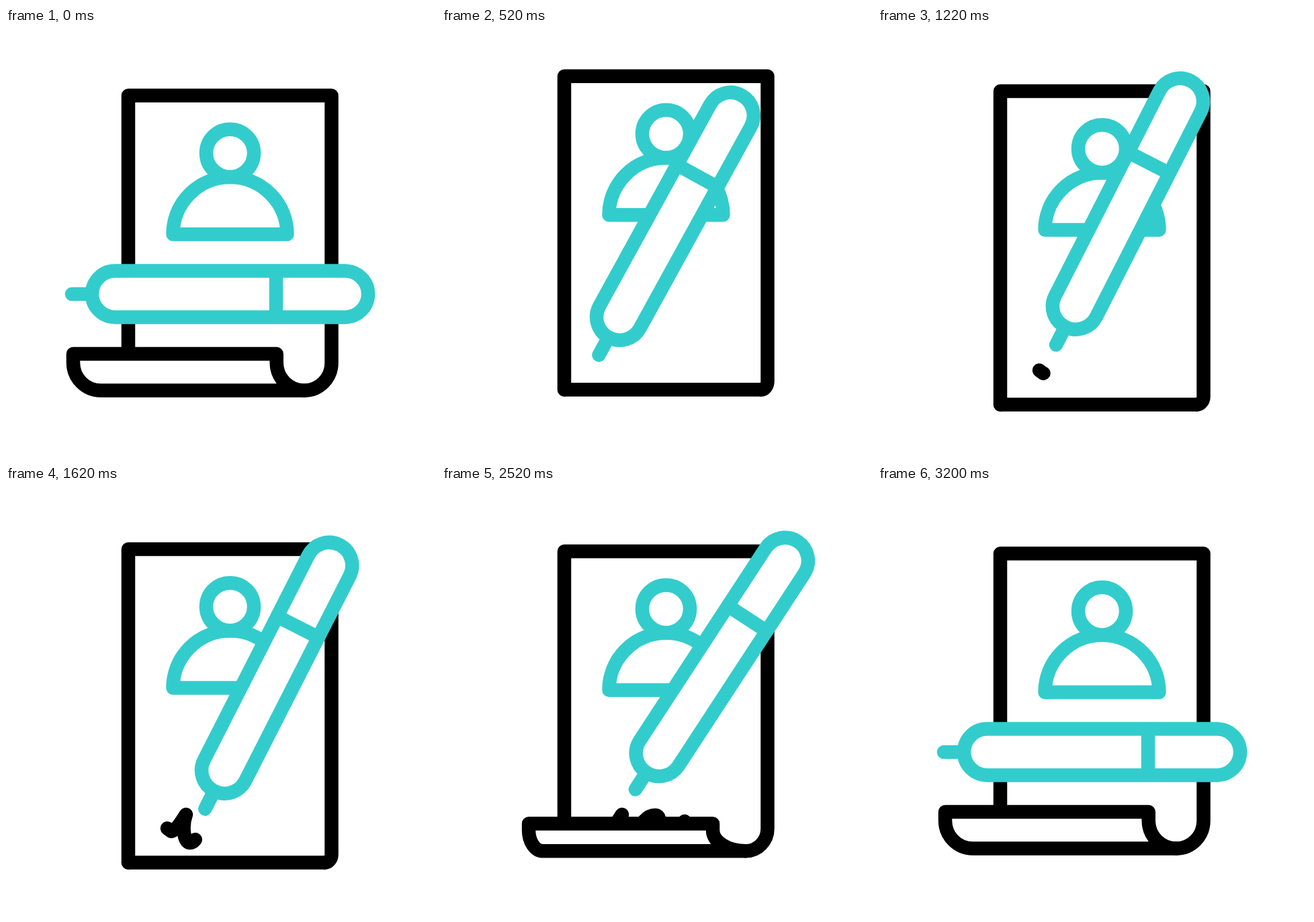
Animation, 640 px wide and 640 px high, one loop 3.22 s. Source, as an HTML page:

```html
<!DOCTYPE html>
<html>
<head>
<meta charset="utf-8">
<style>
  html, body { margin: 0; height: 100%; overflow: hidden; background: #fff; }
  svg { display: block; width: 100%; height: 100%; }
  path, circle, rect { fill: none; stroke: #000; stroke-width: 20.5; stroke-linecap: round; stroke-linejoin: round; }
  .teal * { stroke: #33cccc; }
  .solid { fill: #fff; }
</style>
</head>
<body>
<svg viewBox="0 0 640 640">
  <path id="page"/>
  <g id="person" class="teal">
    <circle cx="333.5" cy="85.7" r="35.5"/>
    <path d="M248.5 206.5A85 85 0 0 1 418.5 206.5Z"/>
  </g>
  <path id="ink" pathLength="1" d="M240 509.5L246 514C255 512 262 497 268 489C262 505 264 531 274 531C287 531 295 490 317 490C333 490 313 529 333 529C343 529 354 513 361 499"/>
  <path id="curl" class="solid"/>
  <g id="pen" class="teal">
    <path d="M0 0H30"/>
    <rect class="solid" x="30" y="-34.4" width="411" height="68.8" rx="34.4"/>
    <path d="M304 -34V34" stroke-linecap="butt"/>
  </g>
  <path id="track" style="stroke:none" d="M240 491L267 470C262 486 264 513 274 513C286 513 287 471 317 471C333 471 313 509 333 509C343 509 357 493 368 475"/>
</svg>
<script>
const LOOP = 3220, TILT = 63;
const el = id => document.getElementById(id);
const [page, person, ink, curl, pen, track] = ['page', 'person', 'ink', 'curl', 'pen', 'track'].map(el);
const trackLen = track.getTotalLength();
const span = (t, a, b) => Math.min(1, Math.max(0, (t - a) / (b - a)));
const smooth = u => u * u * (3 - 2 * u);
const easeOut = (u, p) => 1 - (1 - u) ** p;
const mix = (a, b, u) => a + (b - a) * u;

// c: how far the foot is rolled up, k: resting height, lift: jump while unrolling
function drawPage(c, k, lift) {
  const top = 94 + 6.5 * k + lift;
  const y = 560.5 - 75.5 * c ** .87 + lift;
  const b = 560.5 - 21 * c ** .67 + lift;
  const left = 182 - 82 * c ** 1.45;
  const lip = 402.7 + 71 * (1 - c) ** 4;
  const end = 474.5 - 30.5 * c;
  const ry = .76 * (b - y), rl = 41 * c ** 2.2, rp = 12 + 29 * c;
  page.setAttribute('d', `M182 ${y}V${top}H484.5V${b - rp}A${484.5 - end} ${rp} 0 0 1 ${end} ${b}`);
  curl.setAttribute('d', `M${left} ${y}H${lip}V${b - ry}A${end - lip} ${ry} 0 0 0 ${end} ${b}` +
    `H${left + rl}A${rl} ${ry} 0 0 1 ${left} ${b - ry}Z`);
  person.setAttribute('transform', `translate(0 ${top})`);
}

function drawPen(t) {
  let x, y, tilt;
  if (t < 1080) {
    const u = span(t, 160, 680), f = easeOut(u, 2.6);
    x = mix(98, 240, f);
    y = mix(396, 491, f);
    tilt = TILT * easeOut(u, 3);
  } else if (t < 2180) {
    ({ x, y } = track.getPointAtLength(trackLen * span(t, 1080, 2160)));
    tilt = TILT;
  } else {
    const u = span(t, 2180, 3200), f = smooth(u ** .93);
    x = mix(368, 98, f);
    y = mix(475, 396, f);
    tilt = TILT * (1 - smooth(span(u, .1, 1)) ** 1.3);
  }
  pen.setAttribute('transform', `translate(${x} ${y}) rotate(${-tilt})`);
}

function draw(t) {
  if (t < 2180) {
    const open = smooth(span(t, 160, 400));
    const lift = t < 400 ? open : (1 - span(t, 400, 920)) ** 3;
    drawPage(1 - open, 1 - open, -49 * lift);
  } else {
    drawPage(easeOut(span(t, 2180, 2780), 1.6), smooth(span(t, 2180, 2860)), 0);
  }
  const drawn = span(t, 1170, 2160) ** 1.15;
  ink.style.visibility = drawn > 0 ? 'visible' : 'hidden';
  ink.style.strokeDasharray = `${drawn} 2`;
  drawPen(t);
}

function tick() {
  draw(performance.now() % LOOP);
  requestAnimationFrame(tick);
}
tick();
</script>
</body>
</html>
```
